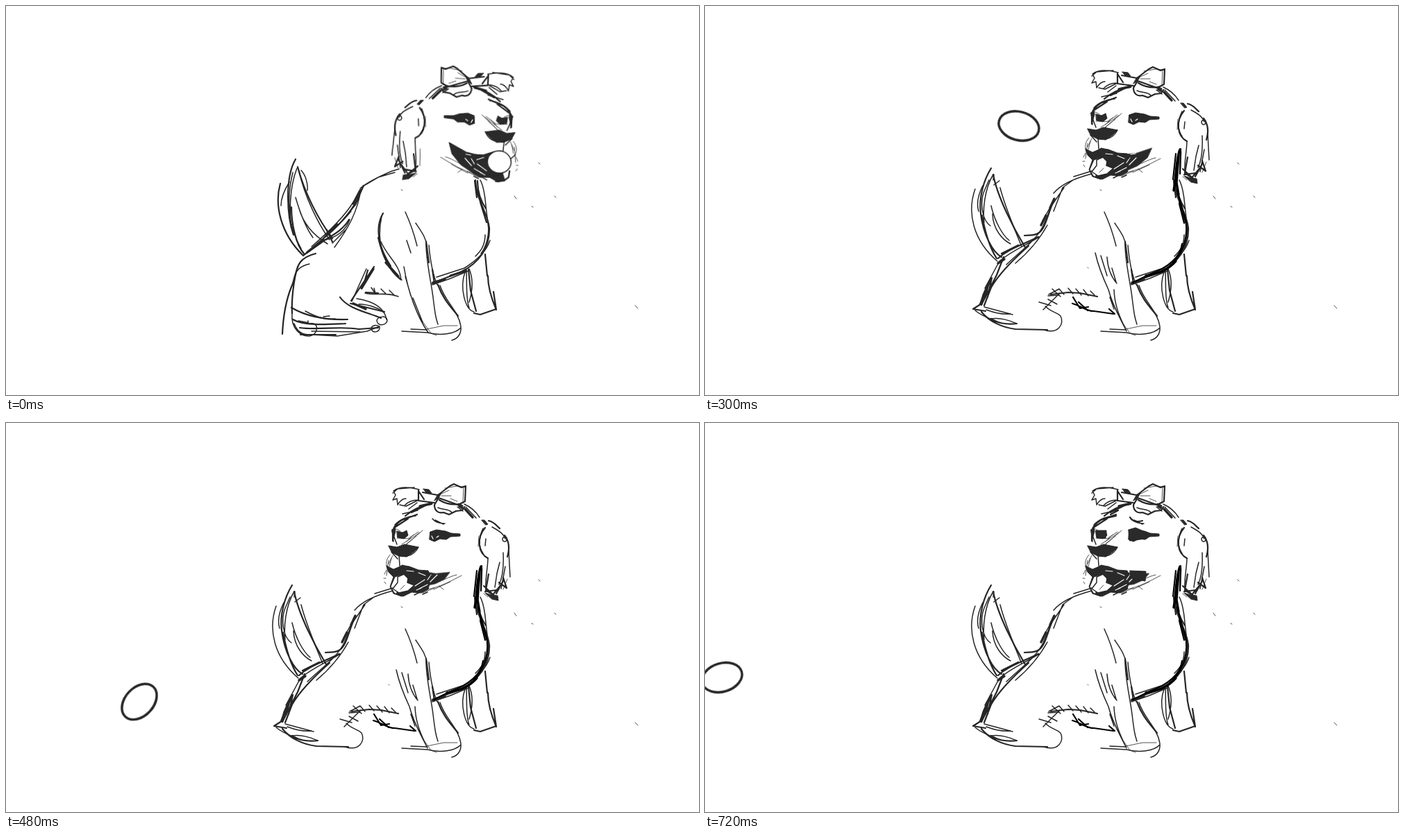
Write an HTML page that moves like this. It is 998 px wide and 561 px high and loops after 750 ms.

```html
<!DOCTYPE html>
<html lang="en">
<head>
<meta charset="utf-8">
<title>Dog and ball</title>
<style>
  html, body { margin: 0; width: 100%; height: 100%; overflow: hidden; background: #fff; }
  svg { display: block; width: 998px; height: 561px; }
  path, ellipse { fill: none; stroke: #262626; stroke-width: 1.5; stroke-linecap: round; stroke-linejoin: round; }
  .thick { stroke-width: 2.2; }
  .heavy { stroke-width: 3.4; }
  .thin { stroke-width: .8; }
  .ink { fill: #2a2a2a; stroke-width: 1; }
  .white { fill: #fff; }
  .cut { stroke: #fff; stroke-width: 1.2; }
  .black { stroke: #000; }

  .sit, .lean, .held, .free, .toss, .brow, .sad, .fly, #head, #lip, #ball {
    animation: 750ms step-end infinite;
  }
  .sit { animation-name: sit; }
  .lean { animation-name: lean; }
  .held { animation-name: held; }
  .free { animation-name: free; }
  .toss { animation-name: toss; }
  .fly { animation-name: fly; }
  .brow { animation-name: brow; }
  .sad { animation-name: sad; }
  #head { animation-name: turn; }
  #lip { animation-name: droop; transform-origin: 606px 222px; }
  #ball { animation-name: bounce; }

  @keyframes sit  { 0% { opacity: 1 } 16%, 100% { opacity: 0 } }
  @keyframes lean { 0% { opacity: 0 } 16%, 100% { opacity: 1 } }
  @keyframes held { 0% { opacity: 1 } 32%, 100% { opacity: 0 } }
  @keyframes free { 0% { opacity: 0 } 32%, 100% { opacity: 1 } }
  @keyframes toss { 0% { opacity: 0 } 32% { opacity: 1 } 40%, 100% { opacity: 0 } }
  @keyframes fly  { 0% { opacity: 0 } 40%, 100% { opacity: 1 } }
  @keyframes brow { 0% { opacity: 0 } 48%, 100% { opacity: 1 } }
  @keyframes sad  { 0% { opacity: 0 } 80%, 100% { opacity: 1 } }
  @keyframes turn {
    0% { transform: matrix(-1, -.07, -.055, 1, 1294, 44) }
    16% { transform: matrix(1, -.135, .115, 1, -20.7, 87) }
    32%, 100% { transform: none }
  }
  @keyframes droop {
    0%, 32% { transform: none }
    40% { transform: rotate(7deg) scale(.9) }
    48% { transform: rotate(14deg) scale(.8) }
    56% { transform: rotate(17deg) scale(.77) }
    64% { transform: rotate(20deg) scale(.74) }
    80%, 100% { transform: rotate(23deg) scale(.74) }
  }
  @keyframes bounce {
    0%, 40% { transform: translate(452px, 173px) rotate(15deg) }
    48% { transform: translate(361.5px, 180px) rotate(-9deg) }
    56% { transform: translate(277px, 264px) rotate(-28deg) }
    64% { transform: translate(192px, 402px) rotate(-47deg) }
    72% { transform: translate(158px, 368px) rotate(-15deg) }
    80% { transform: translate(125.5px, 350.5px) rotate(13deg) }
    88% { transform: translate(75px, 334px) rotate(0deg) }
    96%, 100% { transform: translate(24.5px, 367px) rotate(-17deg) }
  }
</style>
</head>
<body>
<svg viewBox="0 0 998 561">
  <!-- chest, front legs, specks -->
  <path d="M575 297C582 312 588 330 592 346M590 313C600 328 605 335 606 346M605 339C604 365 612 395 615 420S619 450 622 459M609 345C611 368 615 388 621 402"/>
  <path class="thick" d="M605 340L609 370M614 380L617 400M622 402C630 424 641 434 651 447"/>
  <path d="M625 403C632 426 652 440 655 462C656 472 651 480 642 482M570 469L607 471C625 476 647 473 655 464M583 466L606 467"/>
  <path class="thin" d="M606 466L630 461L650 461M600 455L612 472L620 475"/>
  <path class="thick" d="M676 251C677 280 694 298 696 320C697 350 680 371 656 383L614 400M679 252C679 270 685 283 691 292M675 252L678 276M683 283L692 312"/>
  <path d="M683 251C689 262 690 277 691 288L694 314C697 330 691 348 684 357M697 338C692 354 676 368 660 378L620 391M614 402L640 393L666 382M690 330C690 347 682 355 676 361"/>
  <path class="heavy" d="M615 399L632 394M640 389L662 382"/>
  <path class="thick" d="M690 358L693 389M694 389C694 408 700 424 706 438L702 412M674 443L683 445L706 437M666 380L669 410L677 440"/>
  <path d="M661 384C653 406 661 438 674 441M667 379C674 396 671 414 667 427M663 380C664 400 662 424 667 435"/>
  <path class="thin" d="M767 226L769 228M732 274L735 278M757 289L759 290M790 274L792 276M906 432L910 436M569 265L571 266M551 377L552 378"/>

  <g class="sit">
    <path class="thick" d="M417 221C401 248 405 305 414 330M411 290C411 315 418 345 429 357M420 232C430 270 450 308 470 335M395 256C386 288 396 328 427 359"/>
    <path d="M408 254C398 270 396 280 396 288M413 240C403 280 407 320 425 350M419 234C408 262 408 300 411 315M425 237C432 244 435 258 434 266M422 292C429 317 445 332 463 343M417 276C424 300 432 320 442 334M422 238C430 275 450 315 466 337"/>
    <path d="M566 235L556 238C537 246 522 253 510 263M560 240L536 247L514 260L504 286L482 312M511 264C507 296 492 322 473 348M500 283C489 301 468 323 440 347M495 308C489 325 475 334 457 338M497 296C480 317 465 325 458 334M489 323L470 342"/>
    <path class="thick" d="M515 259L506 279C495 300 475 321 455 337L428 360M494 308C484 325 467 332 460 337L429 359M462 323L470 340"/>
    <path class="heavy" d="M510 266L500 285M477 315L463 328M457 337L434 355"/>
    <path class="thick" d="M446 357C414 365 421 383 411 405C403 425 399 451 398 473M420 376C414 395 411 425 412 443"/>
    <path d="M437 372C424 375 417 380 414 396M412 443C410 466 425 477 437 476C448 474 449 464 446 460M415 458C420 471 428 475 440 474L477 476L520 469L538 462"/>
    <path class="thick" d="M411 435C435 449 465 453 492 452M413 452C430 462 465 459 489 458M423 464C450 468 480 461 508 466L536 464M424 474L475 474"/>
    <path d="M431 440C455 453 465 452 474 451M457 448L466 447M421 454L447 459M440 469L510 470M435 454L435 457M526 464C526 474 540 470 538 463C535 459 528 460 526 464M534 453C534 463 549 461 549 453C547 446 537 447 534 453"/>
    <path class="thick" d="M481 420C492 436 518 441 540 450M496 429L545 441M497 425L530 376M515 402L521 381"/>
    <path class="heavy" d="M512 407L529 379M500 429L518 437"/>
    <path d="M519 379L498 426M505 422C530 426 545 435 548 452M508 430C525 430 540 438 544 442M517 414C532 418 550 412 565 419M526 406L532 415L530 407M540 408L548 416M552 410L560 418"/>
    <path class="thick" d="M518 413L536 414M543 299C530 321 538 351 554 375M536 334C542 360 552 382 568 394"/>
    <path d="M541 303C533 340 542 373 570 395M540 340C550 363 567 372 569 395M573 376C579 412 592 448 608 471M575 390L583 418M586 421L600 456M577 338L583 356"/>
    <path class="heavy" d="M547 370L565 390"/>
  </g>

  <g class="lean">
    <path class="thick" d="M412 234C402 250 394 275 397 299C401 330 414 355 427 362M415 243C421 275 444 320 461 348M399 302C404 330 411 350 420 364"/>
    <path d="M389 264C377 298 386 338 421 368M400 259C392 275 391 286 394 296M415 243C402 265 400 295 402 312M409 251L402 267C396 282 398 308 411 317M425 262C432 290 446 322 456 347M414 300C415 322 428 337 440 343M412 288C417 310 428 330 438 338M416 243L415 251M416 258L424 252"/>
    <path class="thick" d="M422 364C436 351 453 346 480 333M427 357L451 345M501 283C492 306 490 320 481 327C474 332 468 330 460 331"/>
    <path d="M557 238L531 246M557 242C530 249 511 259 502 270M530 251L515 262L502 296M517 262L499 288L487 317C475 340 458 350 434 373M500 285L486 310M493 316C481 338 466 355 447 371M481 333C461 346 443 352 424 368L403 407"/>
    <path class="heavy" d="M503 278L497 291M491 302L484 316M431 365L422 371M412 393L401 417L398 430M407 405L403 420"/>
    <path class="thick" d="M430 362L420 388L398 431M466 346C440 369 423 387 412 406L402 432M413 392L407 420M406 404L396 430"/>
    <path class="thick" d="M397 430L386 437L404 440M398 441C410 456 430 464 447 466L493 467M412 451C420 457 434 460 449 458"/>
    <path d="M402 434L443 445M405 438C418 443 430 445 440 444M412 451C427 449 439 454 449 458M389 439C401 449 412 451 420 455M488 467C509 474 518 458 512 447C506 441 499 442 490 433M481 427L498 432M487 438L511 414M494 423L507 430"/>
    <path class="thick" d="M498 416L523 413L540 414L565 419"/>
    <path d="M495 416L510 408M500 408L512 419M510 408L517 416M523 407L530 415M534 408L542 417M545 409L552 418M555 411L561 417M494 418L510 417"/>
    <path d="M562 356C567 378 574 394 581 409C587 433 598 450 607 469M570 360L579 389M579 362C580 380 587 393 593 400M586 378L592 398M589 409C590 436 600 453 605 465M583 420L589 437"/>
  </g>

  <g class="free">
    <path class="heavy black" d="M684 207C678 222 679 245 675 266M682 215L679 255L682 272"/>
    <path class="thick black" d="M678 213L674 250M685 206L684 242M680 260C681 279 690 294 693 315C695 337 687 361 666 378M683 285L690 313M687 343C685 362 666 378 642 386L616 399"/>
    <path class="heavy black" d="M678 368C667 381 652 386 635 389"/>
    <path class="thick black" d="M530 420L540 436L552 434M529 429C544 433 548 440 560 440L588 444M538 427L551 439M582 437L590 444"/>
  </g>

  <path class="toss" style="stroke-width:3" d="M565 188C552 177 529 173 522 183C516 196 530 216 549 224"/>

  <g id="head">
    <!-- bow -->
    <path d="M595 96C580 92 566 92 558 98L561 104L557 111L563 109L564 118C567 113 571 109 576 109M567 118L576 120L594 111M557 101L564 95L588 93M574 119C580 112 588 111 594 111M580 124L592 115"/>
    <path class="thick" d="M594 97L594 112M594 98L602 110M600 100L622 104M594 112L617 115M622 104L639 91L645 88L656 93L662 91L661 113L651 118L623 108L617 118"/>
    <path class="thin" d="M627 105L641 105M632 94L649 91L658 92M659 91L658 116M625 103L638 97M640 109L650 113"/>
    <path class="ink" d="M601 95L609 96L613 101L606 101ZM622 103L627 101L623 108L617 112ZM652 116L658 119L657 124L652 121Z"/>
    <path class="thick" d="M617 118C617 126 622 131 630 129L638 132L648 127L657 126L660 121M624 111C635 118 645 118 654 117"/>
    <path d="M622 122C630 126 637 123 642 129M650 121L658 127M660 117C669 121 677 128 682 136M662 121L677 137"/>
    <path class="heavy" d="M661 124L672 136M596 120L613 116"/>
    <!-- brow line and far eye -->
    <path class="thick" d="M613 117C597 119 583 127 575 134M592 132L570 140C562 145 557 151 557 158L557 170M559 151L579 138M584 129L604 119"/>
    <path d="M556 154L558 171M560 147C567 139 579 134 590 134M571 131L593 126M558 162L563 175"/>
    <path class="ink" d="M563 156L571 158L577 155L579 162L573 167L564 165ZM556 154L560 150L561 156L558 167Z"/>
    <path class="thin" d="M575 176L600 155M570 175L596 158M580 166L594 157M577 171L587 161M558 151L568 156M573 178L591 163M563 166L582 167"/>
    <!-- near eye -->
    <path class="ink" d="M611 157L620 154L633 156L641 159L654 160L654 163L640 164L634 168L625 167L617 171L610 168Z"/>
    <path class="cut" d="M613 163L615 167M620 165L623 163"/>
    <!-- nose and muzzle -->
    <path class="ink" d="M551 177L563 179L574 175L594 179L587 186L577 193L566 192L556 187Z"/>
    <path d="M594 179C590 187 584 191 577 192M566 190L567 206M555 186L564 196"/>
    <path class="thin" d="M553 190C546 198 547 205 550 210M557 191L551 203M551 198L548 220M548 212L545 218M544 224L547 224M545 229L547 232M555 195L552 207"/>
    <!-- mouth -->
    <path class="ink free" d="M548 206L558 211L572 205L574 217L560 222L554 236L559 245L570 250L558 246L553 236L558 222L551 215Z"/>
    <path class="ink" d="M565 209L570 205L581 207L594 212L608 213L612 223L608 240L598 245L584 244L572 250L562 247L566 236L570 217Z"/>
    <path id="lip" class="ink" d="M604 213L620 210L645 198L640 214L626 229L604 242Z"/>
    <path class="cut" d="M589 235L603 226M595 239L607 233M594 216L604 220M611 229L621 219M577 213L587 214M591 241L598 238M613 214L620 213M607 226L612 219"/>
    <path class="thin" d="M606 240C625 237 640 228 656 220M610 233C628 229 638 221 649 219M616 240L640 229M614 229L632 218M624 235L630 240M600 245L617 238"/>
    <path d="M600 247L607 244M588 248L596 244M549 209L557 217"/>
    <g class="free">
      <path class="white" d="M557 239L564 230L564 222L573 218L579 224L578 230L588 234L579 242L566 245Z"/>
      <path class="thin" d="M568 240L574 234M565 247L578 244M602 216L613 221"/>
    </g>
    <g class="held">
      <ellipse class="white" cx="571.5" cy="221" rx="17" ry="16"/>
      <path class="thick" d="M556 233L557 242L563 247L575 249M568 239L578 242"/>
    </g>
    <!-- ear -->
    <path class="ink" d="M685 140L689 140L694 146L691 147Z"/>
    <path class="thick" d="M690 151C677 166 680 188 694 195M695 141C703 142 707 149 711 152M718 162C725 171 725 183 722 193"/>
    <path d="M687 152C680 167 680 178 687 188M691 167L690 177M700 150C713 157 717 161 719 167M715 167C715 173 722 172 721 166C719 163 716 164 715 167M724 184L725 204L726 222M716 187C717 207 716 221 710 233M694 195C694 208 690 224 691 239M711 201L707 217L704 237M719 207L713 239"/>
    <path class="thick" d="M716 223L721 238L710 230M695 218L691 241L708 252M688 235L700 246M714 232L700 249M717 226L706 246M690 243L706 241"/>
    <path class="ink" d="M690 245L699 248L708 249L709 256L700 254Z"/>
    <path class="thin" d="M686 210L685 234M681 163L680 178M722 225L716 240M694 251L688 246"/>
    <!-- worry -->
    <path class="brow" d="M614 138C618 143 624 145 632 145M618 140L630 146"/>
    <g class="sad">
      <path class="thick" d="M612 136C615 142 622 143 630 141M574 138L592 134M584 132L595 126"/>
      <path class="ink" d="M610 154L620 151L636 158L633 167L612 170ZM612 213L635 214L634 228L614 224ZM563 155L578 155L577 166L565 166Z"/>
    </g>
  </g>

  <g class="fly"><ellipse id="ball" rx="29.5" ry="20.5" style="stroke-width:3.4"/></g>
</svg>
</body>
</html>
```
